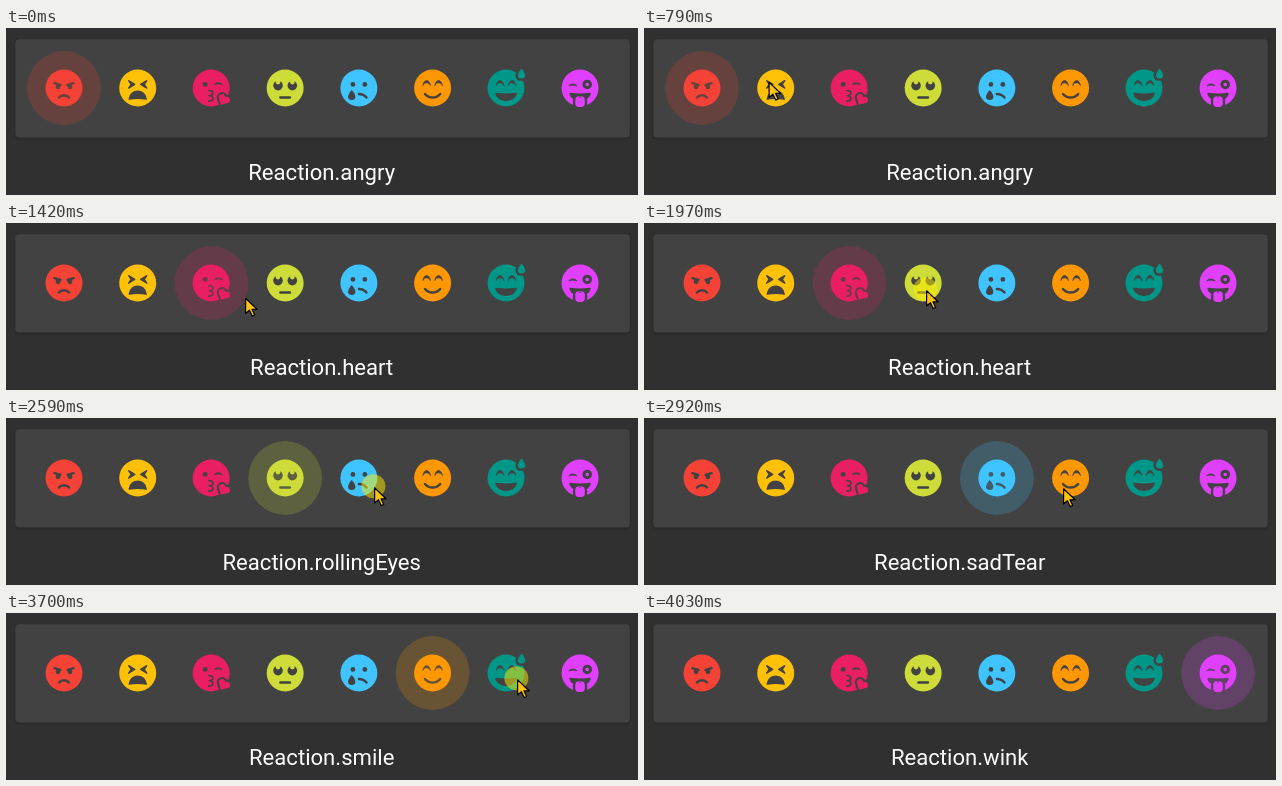
An HTML page that plays this animation: 632x167 px, repeating every 4420 ms.

```html
<!DOCTYPE html>
<html lang="en">
<head>
<meta charset="utf-8">
<title>Reaction picker</title>
<style>
  html, body { margin: 0; width: 100%; height: 100%; overflow: hidden; background: #303030; }
  svg { display: block; width: 632px; height: 167px; }
  .card { fill: #424242; filter: drop-shadow(0 1px 1px rgba(0, 0, 0, .25)); }
  .label { font: 22.1px Roboto, sans-serif; fill: #fff; text-anchor: middle; }
</style>
</head>
<body>
<svg viewBox="0 0 632 167">
  <rect class="card" x="9.3" y="11.3" width="614.5" height="98.2" rx="4"/>
  <g id="faces"></g>
  <text id="label" class="label" x="315.7" y="152"></text>
  <g id="cursor">
    <circle id="press" cx="-.6" cy="-.8" r="12" fill="#ffeb00" fill-opacity=".5"/>
    <path d="M.6 .8V16L4.4 12.7 7.2 18.6 9.7 17.5 7 11.8H12Z"
          fill="#ffc20e" stroke="#000" stroke-width="1.2" stroke-linejoin="round"/>
  </g>
</svg>
<script>
const LOOP = 4420, FRAME = 80;
const PITCH = 73.72, FIRST_X = 58, ROW_Y = 60, SCALE = 0.0746;

// Mask parts on a disc of radius 248 around (248, 256): black cuts, white restores.
const dot = (x, y, r = 32, fill = '#000') => `<circle cx="${x}" cy="${y}" r="${r}" fill="${fill}"/>`;
const line = (d, width = 32, color = '#000', join = 'round') =>
  `<path d="${d}" fill="none" stroke="${color}" stroke-width="${width}" stroke-linecap="round" stroke-linejoin="${join}"/>`;
const blob = (d, width = 0, fill = '#000') =>
  `<path d="${d}" fill="${fill}" stroke="${fill}" stroke-width="${width}" stroke-linejoin="round"/>`;
const move = (x, y, part) => `<g transform="translate(${x} ${y})">${part}</g>`;
const mirror = part => `${part}<g transform="matrix(-1 0 0 1 496 0)">${part}</g>`;

// Closed-eye arch with separate outer and inner heights.
const arch = (x, y, half, outer, inner) => {
  const side = (h, dir) => {
    const c = half * 0.8 * dir, top = y - h * 4 / 3;
    return `C${x - c} ${top} ${x + c} ${top} ${x + half * dir} ${y}`;
  };
  return blob(`M${x - half} ${y}${side(outer, 1)}${side(inner, -1)}z`, 10);
};

const DROP = 'M0-4C70 74 62 128 0 128S-70 74 0-4z';
const HEART = 'M395 381L409 430 459 417';
const beams = mirror(arch(168, 224, 50, 67, 37));
const wink = (x, y) => arch(x, y, 54, 27, 11);
const grin = blob('M118 334Q248 354 378 334C350 442 146 442 118 334z', 28);
const eyes = y => mirror(dot(168, y));

const reactions = [
  { name: 'angry', color: '#f44336', parts:
    mirror(line('M120 192L200 216')) + eyes(240) + line('M180 384C215 342 281 342 316 384') },
  { name: 'tired', color: '#ffc107', parts:
    mirror(blob('M126 158L208 208 126 258 160 208z', 18)) +
    blob('M136 404Q248 378 360 404C340 266 156 266 136 404z', 22) },
  { name: 'heart', color: '#e91e63', dx: -4, parts:
    dot(168, 208) + wink(344, 213) +
    line('M216 289C290 289 290 358 222 360 290 362 290 431 216 431', 22) +
    line(HEART, 142) + line(HEART, 86, '#fff', 'miter') },
  { name: 'rollingEyes', color: '#cddc39', parts:
    mirror(dot(152, 224, 64) + dot(152, 176, 32, '#fff')) + line('M184 384H312') },
  { name: 'sadTear', color: '#40c4ff', parts:
    eyes(208) + move(152, 288, blob(DROP)) + line('M248 336C287 336 325 353 350 384') },
  { name: 'smile', color: '#ff9800', parts:
    beams + line('M146 336C198 400 298 400 350 336') },
  { name: 'sweat', color: '#009688', dx: -4, parts:
    beams + grin + move(456, 0, blob(DROP, 64) + blob(DROP, 0, '#fff')) },
  { name: 'wink', color: '#e040fb', parts:
    wink(152, 229) + dot(344, 208, 64) + dot(344, 208, 24, '#fff') + grin +
    '<rect x="152" y="390" width="192" height="150" rx="40"/>' +
    '<rect x="184" y="366" width="128" height="146" rx="50" fill="#fff"/>' +
    line('M248 364V386', 12) },
];

const byId = id => document.getElementById(id);
const AREA = 'x="-10" y="-10" width="530" height="540"';
byId('faces').innerHTML = reactions.map(({ color, parts, dx = 0 }, i) => `
  <g transform="translate(${FIRST_X + PITCH * i} ${ROW_Y})">
    <circle class="halo" r="36.9" fill="${color}" fill-opacity=".2"/>
    <g transform="scale(${SCALE}) translate(${dx - 248} -256)">
      <mask id="face${i}" maskUnits="userSpaceOnUse" ${AREA}>${dot(248, 256, 248, '#fff')}${parts}</mask>
      <rect ${AREA} fill="${color}" mask="url(#face${i})"/>
    </g>
  </g>`).join('');
const halos = [...document.querySelectorAll('.halo')];

// When each reaction, in row order, becomes the selected one.
const picks = [0, 870, 1420, 2040, 2670, 3150, 3710, 4030];
const presses = [[710, 790], [1970, 2040], [2590, 2670], [3080, 3150], [3630, 3710], [3950, 4030]];
const visits = [[230, 970], [1180, 4030]];

// Pointer moves: begin, end, destination x and y.
const moves = [
  [0, 0, 187, 150], [230, 710, 124.5, 53.5], [1180, 1180, 239, 74.5],
  [1500, 1900, 282, 67], [1960, 2200, 390, 75], [2270, 2420, 368, 69],
  [2680, 2920, 419, 70], [3080, 3300, 511, 66], [3710, 3870, 578, 66],
];

const within = (spans, time) => spans.some(([from, to]) => time >= from && time < to);
const ease = u => u * u * (3 - 2 * u);

// The pointer advances in whole frames, eased between stops.
function pointerAt(time) {
  let x = 0, y = 0;
  for (const [begin, end, toX, toY] of moves) {
    if (time < begin) break;
    const count = Math.round((end - begin) / FRAME);
    const u = time >= end ? 1 : ease(Math.floor((time - begin) / (end - begin) * count) / count);
    x += (toX - x) * u;
    y += (toY - y) * u;
  }
  return [x, y];
}

const show = (node, on) => { node.style.display = on ? '' : 'none'; };
const start = performance.now();

function draw() {
  const time = (performance.now() - start) % LOOP;
  const selected = picks.filter(at => at <= time).length - 1;
  const [x, y] = pointerAt(time);
  halos.forEach((halo, i) => show(halo, i === selected));
  byId('label').textContent = `Reaction.${reactions[selected].name}`;
  byId('cursor').setAttribute('transform', `translate(${x} ${y})`);
  show(byId('cursor'), within(visits, time));
  show(byId('press'), within(presses, time));
  requestAnimationFrame(draw);
}
draw();
</script>
</body>
</html>
```
